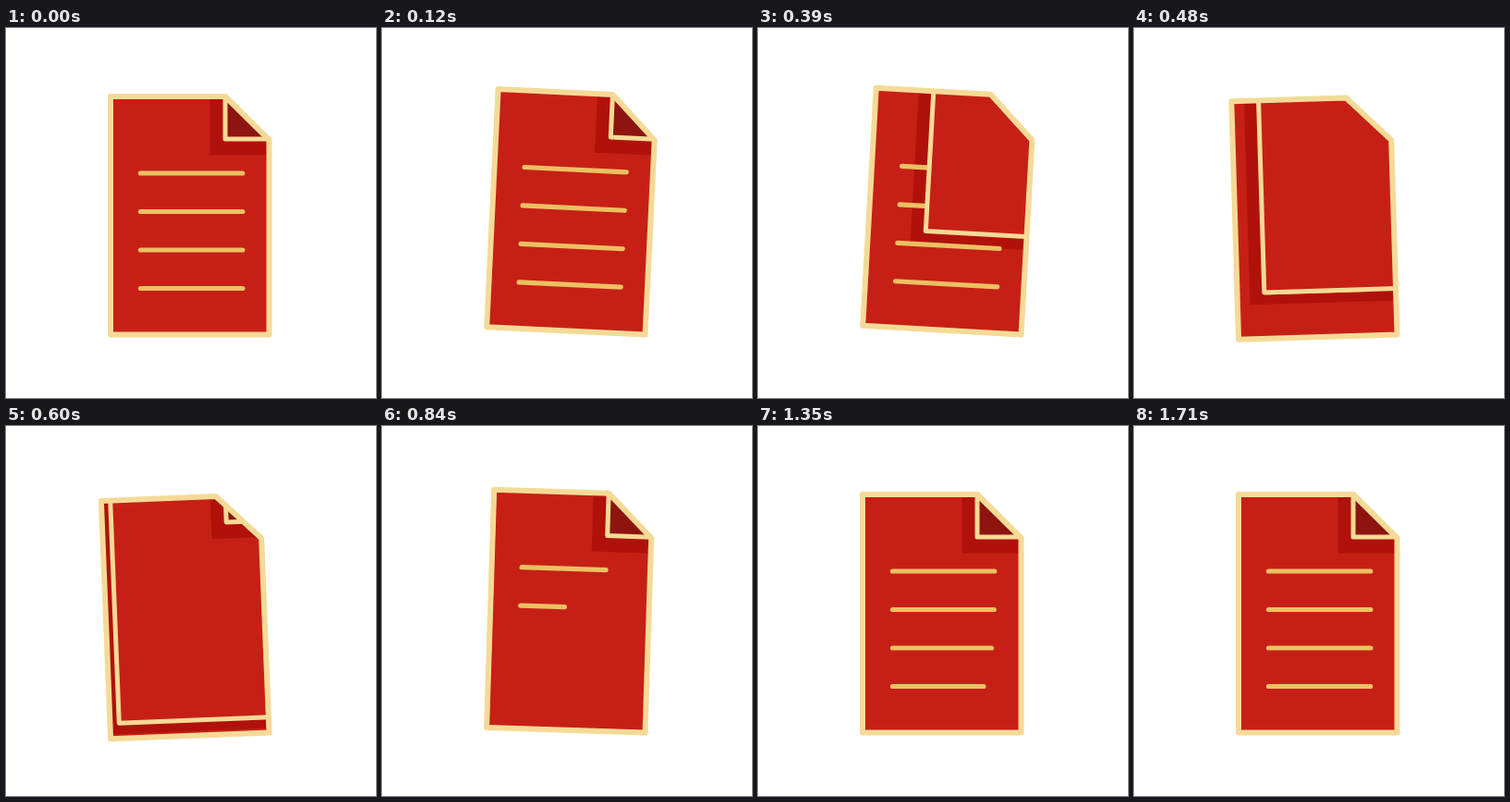
Animation, 400 px wide and 400 px high, one loop 3400 ms. Source, as an HTML page with a canvas:

```html
<!DOCTYPE html>
<html lang="en">
<head>
<meta charset="utf-8">
<title>Turning page</title>
<style>
  html, body { margin: 0; width: 100%; height: 100%; overflow: hidden; background: #fff; }
  canvas { display: block; width: 100vmin; height: 100vmin; }
</style>
</head>
<body>
<canvas width="400" height="400"></canvas>
<script>
const ctx = document.querySelector("canvas").getContext("2d");
const LOOP = 3400;
const LEFT = 113, TOP = 74, RIGHT = 284.5, BOTTOM = 331.5;
const FOLD = { x: 237, y: 120 };
const BORDER = "#f5da96", INK = "#ecc162", SHADOW = "#b0120b";
const PAPER = [198, 32, 22], BACK = [142, 20, 16];

// Swing of the page around its bottom right corner: [time, degrees]
const SWING = [[0, 0], [280, 7], [546, -3.15], [750, 2], [1200, 0]];

const page = new Path2D(
  `M${LEFT} ${TOP}H${FOLD.x}L${RIGHT} 121V${BOTTOM}H${LEFT}Z`);

const mix = (a, b, u) => a + (b - a) * u;
const rgb = (a, b, u) => `rgb(${a.map((v, i) => Math.round(mix(v, b[i], u)))})`;

// Exponential ease-out, slightly overscaled so that it really arrives
const settle = (time, rate, scale) =>
  time <= 0 ? 0 : Math.min(1, scale * (1 - Math.exp(-rate * time)));

function swingAngle(t) {
  const next = SWING.findIndex(key => key[0] > t);
  if (next < 0) return 0;
  const [t0, a0] = SWING[next - 1], [t1, a1] = SWING[next];
  const u = (1 - Math.cos(Math.PI * (t - t0) / (t1 - t0))) / 2;
  return mix(a0, a1, u) * Math.PI / 180;
}

// A folded corner: its shadow reaches dx, dy beyond the vertex
function drawShadow(x, y, dx, dy) {
  ctx.fillStyle = SHADOW;
  ctx.fillRect(x - dx, 0, 400, y + dy);
}

function drawFold(x, y, color) {
  ctx.fillStyle = color;
  ctx.fillRect(x, 0, 400, y);
  ctx.strokeStyle = BORDER;
  ctx.lineWidth = 5;
  ctx.beginPath();
  ctx.moveTo(x, 0);
  ctx.lineTo(x, y);
  ctx.lineTo(400, y);
  ctx.stroke();
}

function drawLines(progress) {
  ctx.strokeStyle = INK;
  ctx.lineWidth = 5.2;
  for (let i = 0; i < 4; i++) {
    const u = progress(i);
    if (u <= 0) continue;
    const y = 157 + 41.5 * i;
    ctx.beginPath();
    ctx.moveTo(145.5, y);
    ctx.lineTo(145.5 + 110.3 * u, y);
    ctx.stroke();
  }
}

function draw(now) {
  const t = now % LOOP;
  ctx.clearRect(0, 0, 400, 400);
  ctx.lineCap = ctx.lineJoin = "round";
  ctx.save();
  ctx.translate(RIGHT, BOTTOM);
  ctx.rotate(swingAngle(t));
  ctx.translate(-RIGHT, -BOTTOM);

  ctx.save();
  ctx.clip(page);
  ctx.fillStyle = rgb(PAPER, PAPER, 0);
  ctx.fillRect(0, 0, 400, 400);

  // The corner sweeps over the old sheet and becomes the new one
  const turn = settle(t - 306, 0.0079, 1.02);
  const x = mix(FOLD.x, LEFT, turn), y = mix(FOLD.y, BOTTOM, turn);
  drawShadow(x, y, 16.5 - turn, 17.5 - 6 * turn);
  drawLines(() => 1);
  drawFold(x, y, rgb(BACK, PAPER, Math.min(1, turn * 3)));

  // The next corner folds in on the new sheet
  const curl = settle(t - 516, 0.0121, 1.02);
  if (curl > 0) {
    const cx = FOLD.x + 30 * (1 - curl), cy = FOLD.y - 51.2 * (1 - curl);
    drawShadow(cx, cy, 16.5, 17.5);
    drawFold(cx, cy, rgb(BACK, BACK, 0));
  }
  drawLines(i => settle(t - 618 - 150 * i, 0.0077, 1.006));
  ctx.restore();

  ctx.strokeStyle = BORDER;
  ctx.lineWidth = 6;
  ctx.stroke(page);
  ctx.restore();
  requestAnimationFrame(draw);
}
requestAnimationFrame(draw);
</script>
</body>
</html>
```
